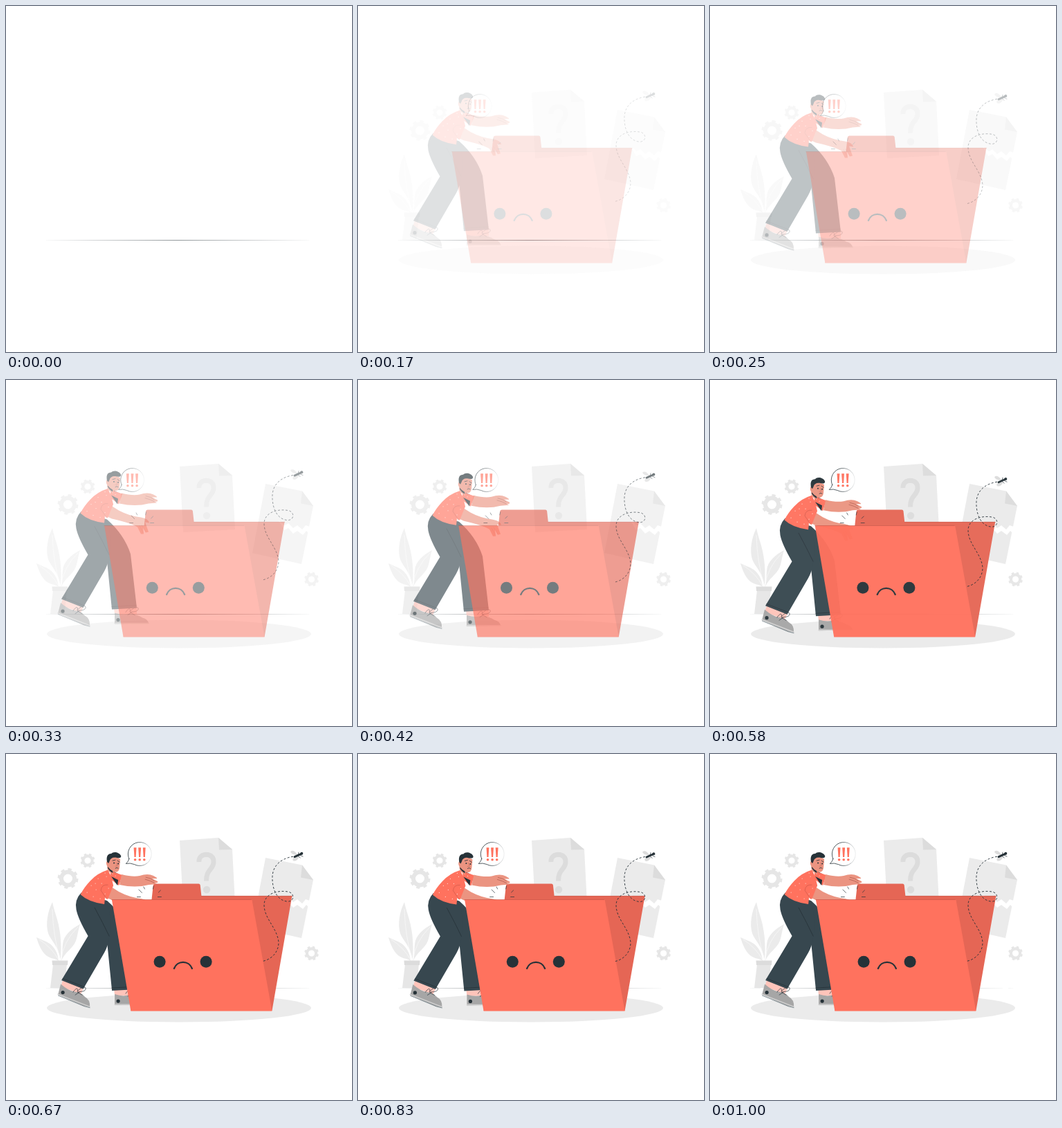
These frames come from a looping animation (500 px wide and 500 px high, 1040 ms). An HTML page:

```html
<!DOCTYPE html>
<html lang="en">
<head>
<meta charset="utf-8">
<title>Sad folder</title>
<style>
html, body { margin: 0; width: 100%; height: 100%; overflow: hidden; background: #fff; }
svg { display: block; width: 100vw; height: 100vh; }
</style>
</head>
<body>
<svg viewBox="0 0 500 500" fill="none" stroke-linecap="round" stroke-linejoin="round">
  <defs>
    <g id="gear" stroke="#e6e6e6" stroke-linecap="butt">
      <circle r="9.500" stroke-width="6"/>
      <circle r="13.200" stroke-width="3.600" pathLength="16" stroke-dasharray="1 1"/>
    </g>
    <linearGradient id="outline">
      <stop offset=".4" stop-color="#263238"/>
      <stop offset="1" stop-color="#263238" stop-opacity=".1"/>
    </linearGradient>
  </defs>

  <g class="fade">
    <use href="#gear" transform="translate(89.500 180)"/>
    <use href="#gear" transform="translate(118 154) rotate(12) scale(.7)"/>
    <use href="#gear" transform="translate(441.500 288) rotate(8) scale(.7)"/>

    <g fill="#ebebeb">
      <path d="M67 214C60 228 57 246 61 259C65 270 75 276 79 297C80 281 80 266 76 247C73 234 70 228 67 214Z"/>
      <path d="M107 246C95 252 83 262 82 275C81 285 82 290 80 299C85 286 96 282 101 270C104 261 104 255 107 246Z"/>
      <path d="M44 265C47 275 51 285 58 291C64 296 71 295 76 299C75 288 71 280 63 274C57 270 50 268 44 265Z"/>
      <path d="M67 224Q68 264 79 299Q83 270 104 250M48 268Q66 279 77 299" stroke="#fafafa" stroke-width=".7" fill="none"/>
    </g>
    <path d="M68 304H88L84.500 338H64Z" fill="#e6e6e6"/>
    <path d="M66.500 298.500H89.500L89 305H67Z" fill="#dcdcdc"/>
    <ellipse cx="250" cy="367" rx="191" ry="20.500" fill="#ebebeb"/>

    <path d="M251 125L307 121L327 138L331 216L256 220Z" fill="#ebebeb"/>
    <path d="M307 121L308 138.500L327 138Z" fill="#dcdcdc"/>
    <path d="M279 156C277.500 142 301 141 300 156.500C299.500 167 289 167 289.500 183.500" stroke="#dcdcdc" stroke-width="7" stroke-linecap="butt"/>
    <circle cx="290" cy="196" r="5.200" fill="#dcdcdc"/>
    <path d="M375 150L428 160.500L444 182L427 266L356 250Z" fill="#ebebeb"/>
    <path d="M428 160.500L426 178.500L444 182Z" fill="#dcdcdc"/>
    <path d="M394 203L403 210L408 207L415 214L421 210L428 216L433 210L439 212L437 221L434 218L429 224L421 218L415 222L408 214L402 217Z" fill="#fff"/>
  </g>

  <path d="M50 338.300L248 338L446 338.300L248 338.600Z" fill="#263238"/>

  <g class="fade man">
    <path d="M82 327L79 336L108 347L112 338Z" fill="#ffc4ba"/>
    <path d="M156 340H189V349H157Z" fill="#ffc4ba"/>
    <path d="M79 332.500Q90 342 99 343.500Q108 344 114 351Q122 355 121 366L112 364L75 348Z" fill="#a6a6a6"/>
    <path d="M75 347L113 362L121 365" stroke="#d0d0d0" stroke-width="1.500"/>
    <path d="M75.500 349L113 364.500L121 366.500" stroke="#455a64" stroke-width=".6"/>
    <path d="M157 347Q169 351 178 348Q190 349 197 354Q205 356 206 362L157 363Z" fill="#a6a6a6"/>
    <path d="M157 362H206" stroke="#d0d0d0" stroke-width="1.500"/>
    <g fill="#263238"><circle cx="82" cy="344.500" r="2.600"/><circle cx="162" cy="357" r="2.600"/></g>
    <path id="lace" d="M97 344C101 337 105 338 103 343C109 336 116 335 115 340C113 344 107 343 103 344L110 348M100 348L106 344" stroke="#263238" stroke-width=".7"/>
    <use href="#lace" transform="translate(76 2)"/>

    <path d="M109 201L146 212Q171 234 180 262L189 340L153 342L146 272L128 230Z" fill="#37474f"/>
    <path d="M108.500 200.500L146 215Q154 240 149 265Q148 276 142 287L111.500 339.500L80 327L118.500 263Q104 238 101.500 225Q98.500 211 108.500 200.500Z" fill="#37474f"/>
    <path d="M128 222Q140 244 149 263M82 324.500L113 336.500M153 338L188 336" stroke="#263238" stroke-width=".8"/>

    <path d="M146 189Q154 193 163 199Q178 207 195 209Q206 211 207 217L201 216L206 230L202 231L198 223L199 233L195 233L190 223Q180 217 153 211Q142 207 138 198Z" fill="#eb9481"/>
    <path d="M193 221L198 231M196 220L202 230" stroke="#c76c5e" stroke-width=".6"/>
    <path d="M150 167L153 178L162 186L167 176Q160 172 150 167Z" fill="#263238"/>
    <path d="M147 167.500Q132 172 121.500 183.500Q112.500 193 107.500 203Q119 214 142 217Q143 210 143 204L155 190L152 177Z" fill="#ff725e"/>
    <path d="M151 169L168 175L163 190L151 181Z" fill="#ff725e"/>
    <path d="M152 177L162 182L161 190Z" fill="#263238"/>
    <path d="M137 196Q140 207 147 210L155 190Q148 186 142 185" fill="#ff725e"/>
    <path d="M147 189Q138 188 137 197L145 209" stroke="#cf5a4b" stroke-width=".7"/>
    <path d="M133 180h.1M123 190h.1M138 187h.1M130 196h.1M117 200h.1M126 206h.1M136 209h.1M145 177h.1M148 194h.1M143 202h.1M158 176h.1M143 172h.1M129 187h.1" stroke="#ffd0c8" stroke-width="1.200"/>

    <path d="M147 154Q143 156 146 162L147 169Q152 172 155 175L154 170Q163 173 164 164L165 152Q158 147 150 149Z" fill="#eb9481"/>
    <path d="M146 156C145 151 145 144 152 144C155 140 164 142 166 147C167 151 162 150.500 158 149.500Q151 149 149.500 155L148 158Z" fill="#263238"/>
    <path d="M147 163Q150 167 154 169L154 172Q149 169 147 165Z" fill="#263238"/>
    <g fill="#263238"><circle cx="156" cy="157.500" r="1"/><circle cx="162" cy="158.500" r="1"/></g>
    <path d="M154 154L158 153M161 154L164 156M158 165Q160 163 162 165" stroke="#263238" stroke-width=".8"/>
    <path d="M159 157L161 162L158 162" stroke="#c76c5e" stroke-width=".7"/>
  </g>

  <g class="fade folder">
    <path d="M210 211L212.300 190Q212.600 187.500 215 187.500H278Q280 187.500 280.300 189.500L282 205H413L384 371H180Z" fill="#e56655"/>
    <path d="M152.500 210.500H355L384 371.500H180Z" fill="#ff725e"/>
    <path d="M282 205.300H413M152.500 210.500H354" stroke="#c35345" stroke-width=".6"/>
    <path d="M189 206.500H194M191.500 196L196 200.500M198.500 192L200 195M220 200L223 197M219 206.500H224M212 195L213 191" stroke="#263238" stroke-width=".7"/>
    <g fill="#263238"><circle cx="221.700" cy="300.300" r="8.500"/><circle cx="288.700" cy="300.300" r="8.500"/></g>
    <path d="M242.500 310C247 297.700 264 297.700 268.500 310" stroke="#263238" stroke-width="2.300"/>
  </g>

  <g class="fade man">
    <path d="M167 174Q183 178 193 176Q205 172 213 176Q219 179 218 180L211 180L219 184Q220 187 215 186L218 188L206 189Q187 194 164 189Z" fill="#eb9481"/>
    <path d="M202 178Q209 179 214 183M201 181Q209 183 214 186" stroke="#a9584c" stroke-width=".7"/>
  </g>

  <g class="fade bubble">
    <path d="M177.500 151.500A17 17 0 1 1 185 159.500Q179 157 173 158.500Q177 155 177.500 151.500Z" fill="#fff" stroke="url(#outline)" stroke-width=".8"/>
    <g fill="#ff725e">
      <path id="bang" d="M184.300 135.200H188.200L187.300 149H185.200Z"/>
      <circle id="dot" cx="186.300" cy="152.700" r="1.800"/>
      <use href="#bang" x="6.600"/><use href="#dot" x="6.600"/>
      <use href="#bang" x="13.200"/><use href="#dot" x="13.200"/>
    </g>
  </g>

  <g class="fade fly">
    <path d="M415 148C396 151 386 162 385 176C384 197 393 213 408 213C417 212 417 201 408 199C392 196 373 202 373 218C373 238 392 251 394 272C394 286 384 297 370 299.500" stroke="#263238" stroke-width=".9" stroke-dasharray="3 2.500" stroke-linecap="butt"/>
    <path d="M421 145Q415 137 411 141Q412 145 421 146ZM421 148Q412 150 415 154Q420 156 424 148Z" fill="#dcdcdc"/>
    <path d="M417 148.500L427 144" stroke="#263238" stroke-width="2.800"/>
    <circle cx="427.300" cy="143.700" r="2" fill="#263238"/>
    <path d="M422 147L425 150M425 146L429 148M422 146L423 142" stroke="#263238" stroke-width=".7"/>
  </g>
</svg>
<script>
const LOOP = 1040, STEP = 1000 / 24;
const all = name => document.querySelectorAll("." + name);
const shift = (name, x, y) =>
  all(name).forEach(g => g.setAttribute("transform", `translate(${x} ${y})`));

function draw(time) {
  const step = Math.min(24, Math.floor((time % LOOP + 5) / STEP));
  const entry = Math.min(1, Math.max(0, (step - 2) / 12.5));
  const slide = -20 * (1 - entry);
  // After the entry everything sways out once and starts back.
  const sway = step > 14 ? (1 - Math.cos((step - 14) / 6 * Math.PI)) / 2 : 0;

  all("fade").forEach(g => g.setAttribute("opacity", entry));
  shift("folder", slide + 1.6 * sway, 0);
  shift("bubble", slide + 1.2 * sway, 0);
  shift("man", 0.4 * sway, slide + 0.4 * sway);
  shift("fly", 0, slide + 0.5 * sway);
}

const start = performance.now();
function tick() {
  draw(performance.now() - start);
  requestAnimationFrame(tick);
}
tick();
</script>
</body>
</html>
```
